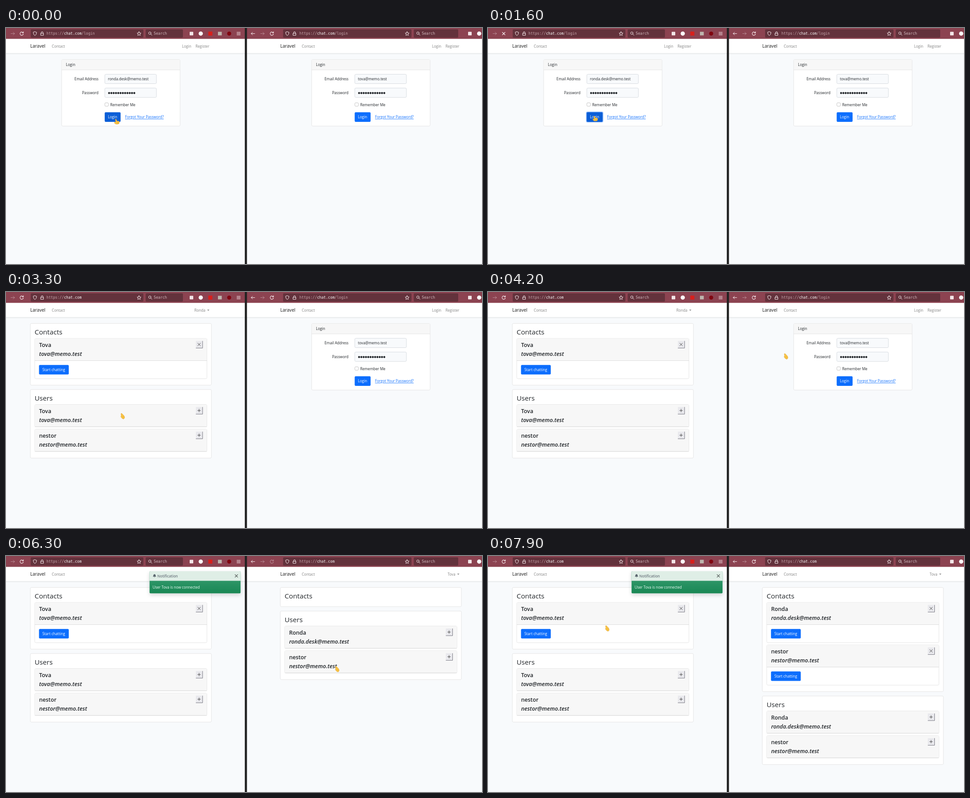
Write an HTML page that moves like this. It is 1060 by 528 pixels and loops after 8 s.

```html
<!DOCTYPE html>
<html lang="en">
<head>
<meta charset="utf-8">
<title>Two browsers, one chat</title>
<style>
html, body { margin: 0; width: 100%; height: 100%; overflow: hidden; background: #f8fafc; }
svg { display: block; width: 1060px; height: 528px; font-family: "Open Sans", sans-serif; }
.mono { font-family: "DejaVu Sans Mono", monospace; }
</style>
</head>
<body>
<svg id="stage" viewBox="0 0 1060 528"></svg>
<script>
const LOOP = 8000, STEP = 100, PANE_SHIFT = 556.7;
const BLUE = '#0d6efd', BLUE_HOVER = '#0b5ed7', INK = '#212529', MUTED = '#808080';
const LINE = '#dfdfdf', PALE = '#f7f7f7', SMALL = 8.15;

const ronda = { name: 'Ronda', email: 'ronda.desk@memo.test' };
const tova = { name: 'Tova', email: 'tova@memo.test' };
const nestor = { name: 'nestor', email: 'nestor@memo.test' };

// Times at which each browser changes
const panes = [
  { dx: 0, user: ronda, contacts: [tova], users: [tova, nestor],
    press: 1200, loading: 1300, open: 1900, contactsAt: 2200, usersAt: 2800, idleAt: 2800,
    bar: { forward: 15, reload: 35, field: [55, 251], search: [311, 83], extras: 413 } },
  { dx: PANE_SHIFT, user: tova, contacts: [ronda, nestor], users: [ronda, nestor],
    press: 5100, loading: 5200, open: 5700, contactsAt: 6700, usersAt: 6000, idleAt: 6600,
    bar: { back: 550, forward: 571, reload: 592, field: [617, 286], search: [908, 99], extras: 1033 } }
];
const NOTICE_AT = 6100;

// Pointer: time, left, top
const path = [
  [0, 241, 203], [100, 241, 203], [300, 262, 196], [500, 283, 172], [600, 270, 166], [800, 247, 205],
  [1000, 236, 199], [1100, 233, 196], [1900, 233, 196], [2300, 245, 190], [2500, 245, 190],
  [2600, 247, 189], [3000, 262, 225], [3400, 253, 286], [3600, 385, 195], [3800, 555, 122],
  [3900, 616, 137], [4100, 616, 137], [4200, 659, 137], [4500, 750, 176], [4800, 799, 203],
  [5700, 799, 203], [6000, 765, 228], [6300, 733, 246], [6600, 731, 248], [7000, 625, 195],
  [7400, 465, 139], [7500, 448, 145], [7700, 448, 145], [7800, 350, 151], [7900, 261, 155]
];

const icons = {
  right: 'M-4 0H4M1-3L4 0L1 3',
  left: 'M4 0H-4M-1-3L-4 0L-1 3',
  reload: 'M3.1-1.9A3.7 3.7 0 1 0 3.6 1M3.7-4.2V-1.5H1',
  cross: 'M-3-3L3 3M3-3L-3 3',
  plus: 'M-3.2 0H3.2M0-3.2V3.2',
  shield: 'M0-4.2L3.7-2.8Q3.7 2.6 0 4.3Q-3.7 2.6-3.7-2.8Z',
  lock: 'M-3-.5H3V4H-3ZM-2-.5V-2A2 2 0 0 1 2-2V-.5',
  star: 'M0-4.3L1.3-1.4L4.4-1.1L2.1 1L2.7 4.1L0 2.5L-2.7 4.1L-2.1 1L-4.4-1.1L-1.3-1.4Z',
  lens: 'M2-1A2.7 2.7 0 1 1-3.4-1A2.7 2.7 0 1 1 2-1M1.3 1L4 3.8',
  menu: 'M-3.8-2.8H3.8M-3.8 0H3.8M-3.8 2.8H3.8'
};

const rect = (x, y, w, h, fill, extra = '') =>
  `<rect x="${x}" y="${y}" width="${w}" height="${h}" fill="${fill}" ${extra}/>`;
const box = (x, y, w, h, fill = '#fff', line = LINE) =>
  rect(x, y, w, h, fill, `rx="2.5" stroke="${line}" stroke-width=".8"`);
const text = (x, y, content, size = SMALL, fill = INK, extra = '') =>
  `<text x="${x}" y="${y}" font-size="${size}" fill="${fill}" ${extra}>${content}</text>`;
const shape = (d, fill, extra = '') => `<path d="${d}" fill="${fill}" ${extra}/>`;
const icon = (name, x, y, color = '#fbf0f2', width = 1, opacity = 1) =>
  shape(icons[name], 'none', `transform="translate(${x} ${y})" stroke="${color}" stroke-width="${width}"
    stroke-linecap="round" stroke-linejoin="round" opacity="${opacity}"`);
const dot = (x, y, r, fill) => `<circle cx="${x}" cy="${y}" r="${r}" fill="${fill}"/>`;

function pointerAt(t) {
  const next = path.findIndex(key => key[0] > t);
  if (next < 0) return path.at(-1).slice(1);
  const [t0, x0, y0] = path[next - 1], [t1, x1, y1] = path[next];
  const k = (t - t0) / (t1 - t0);
  return [x0 + (x1 - x0) * k, y0 + (y1 - y0) * k];
}

function toolbar(pane, t) {
  const { back, forward, reload, field, search, extras } = pane.bar;
  const x = field[0], busy = t >= pane.loading && t < pane.open;
  const resting = t >= pane.open && t < pane.idleAt;
  const page = t < pane.open ? '/login' : '';
  let out = back ? icon('left', back, 12.5) : '';
  out += icon('right', forward, 12.5, '#fbf0f2', 1, .4);
  out += icon(busy ? 'cross' : 'reload', reload, 12.5, '#fbf0f2', 1.1, resting ? .4 : 1);
  out += rect(x, 3, field[1], 18.5, '#63323c', 'rx="2"') + rect(search[0], 3, search[1], 18.5, '#63323c', 'rx="2"');
  out += icon('shield', x + 9.5, 12.5) + icon('lock', x + 25.5, 12.3) + icon('star', x + field[1] - 9.7, 12.5);
  out += text(x + (back ? 36.5 : 35), 15, `https://<tspan fill="#fff">chat.com</tspan>${page}`, SMALL, '#c5a5ab', 'class="mono"');
  out += icon('lens', search[0] + 10, 12.5) + text(search[0] + 18, 15, 'Search', SMALL, '#d3bbc0', 'class="mono"');
  out += rect(extras - 4, 8.5, 8, 8, '#f3e6e8', 'rx="1"') + dot(extras + 20.7, 12.5, 4.7, '#fff');
  if (!back) {
    out += rect(450.5, 8, 9, 9, '#d8201c') + rect(472, 8.5, 8.5, 8, '#bdb6ae');
    out += dot(497, 12.5, 4.5, '#800610') + icon('menu', 518, 12.5);
  }
  return out;
}

function navbar(pane, loggedIn) {
  let out = text(54, 44.3, 'Laravel', 10.1, '#191919') + text(102, 44, 'Contact', SMALL, MUTED);
  if (loggedIn) {
    out += text(444, 44, pane.user.name, SMALL, MUTED, 'text-anchor="end"') + shape('M448 39.4H453L450.5 42Z', MUTED);
  } else {
    out += text(392, 44, 'Login', SMALL, MUTED) + text(422, 44, 'Register', SMALL, MUTED);
  }
  return out;
}

function loginPage(pane, t, hover) {
  const label = (y, s) => text(206, y, s, SMALL, INK, 'text-anchor="end"');
  let out = box(124, 70.4, 263.7, 149) + rect(124.4, 70.8, 262.9, 23, PALE) + rect(124, 93.4, 263.7, .8, LINE);
  out += text(133.5, 85.4, 'Login');
  out += label(117.2, 'Email Address') + box(220, 103.5, 115, 21, '#f8fafc', '#ced4da') + text(227, 117.2, pane.user.email);
  out += label(148, 'Password') + box(220, 134.3, 115, 21, '#f8fafc', '#ced4da');
  for (let i = 0; i < 12; i++) out += dot(229.6 + i * 5.1, 145.5, 2.2, INK);
  out += rect(220.2, 167.3, 7.8, 7.8, '#fff', 'rx="2" stroke="#b5b5b5" stroke-width=".8"') + text(232, 174.5, 'Remember Me');
  if (t >= pane.press) out += rect(218.2, 187, 38.6, 24.3, '#94bdfb', 'rx="3.5"');
  out += rect(219.8, 188.5, 35.4, 21.4, hover === 'login' ? BLUE_HOVER : BLUE, 'rx="2.2"') + text(227, 202.4, 'Login', SMALL, '#fff');
  return out + text(265, 202.4, 'Forgot Your Password?', SMALL, hover === 'link' ? '#0a58ca' : BLUE, 'text-decoration="underline"');
}

function person(y, { name, email }, isContact) {
  let out = box(64, y, 383.5, isContact ? 90 : 50);
  out += rect(64.4, y + .4, 382.7, 49, PALE) + rect(64, y + 49.2, 383.5, .8, '#d5d5d5');
  out += text(73.7, y + 18.9, name, 12.3, INK, 'font-weight="600"');
  out += text(73.7, y + 39, email, 12.4, INK, 'font-weight="600" font-style="italic"');
  out += rect(422.8, y + 5.6, 15.4, 16.2, '#e9e9ed') + shape(`M422.8 ${y + 21.5}H437.8V${y + 5.6}`, 'none', 'stroke="#777781" stroke-width="1"');
  out += icon(isContact ? 'cross' : 'plus', 430, y + 13.5, '#222', .8);
  if (isContact) out += rect(73.5, y + 59.3, 66.3, 21.2, BLUE, 'rx="2.2"') + text(81, y + 73, 'Start chatting', SMALL, '#fff');
  return out;
}

function listCard(y, title, people, isContact) {
  const pitch = isContact ? 95 : 55.2;
  const height = 43 + people.length * pitch;
  const items = people.map((p, i) => person(y + 33.5 + i * pitch, p, isContact)).join('');
  return [box(54.2, y, 403.2, height) + text(63.8, y + 24.5, title, 15.2) + items, y + height + 9.8];
}

function homePage(pane, t) {
  const [contacts, nextY] = listCard(70.4, 'Contacts', t >= pane.contactsAt ? pane.contacts : [], true);
  return contacts + listCard(nextY, 'Users', t >= pane.usersAt ? pane.users : [], false)[0];
}

function notice() {
  return `<g filter="url(#soft)">${rect(319.7, 34, 202.6, 49.4, 'url(#green)', 'rx="2"')}</g>`
    + shape('M319.7 55.5V36Q319.7 34 321.7 34H520.3Q522.3 34 522.3 36V55.5Z', '#dfeee6')
    + shape('M327 46.2Q328.2 45 328.2 43Q328.3 41 330.7 40.4Q333.2 41 333.2 43Q333.2 45 334.5 46.2ZM329.6 46.8H331.9Q330.7 48.6 329.6 46.8Z', '#5d6870')
    + text(337, 47.7, 'Notification', 8, '#6c757d', 'font-weight="600"')
    + icon('cross', 513, 44.5, '#5b625f', 1.1)
    + text(326.5, 73, `User ${tova.name} is now connected`, SMALL, '#f2fff8');
}

function hoverTarget(pane, t, [x, y]) {
  const px = x + 3 - pane.dx, py = y + 1;
  if (t >= pane.open) return '';
  if (px > 220 && px < 255 && py > 188 && py < 210) return 'login';
  return px > 265 && px < 351 && py > 194 && py < 206 ? 'link' : '';
}

function hand([x, y], pointing) {
  const outline = pointing
    ? 'M2.6 1.5Q4 0 4.8 2L5.8 5L10 5.4Q11.6 6 11.2 9Q10.8 12 8 12H3.4L.4 9.4Q0 7.4 1.6 7.6L3.6 8.2Z'
    : 'M.8 1.6Q1.8-.2 3.2 1.6L7.4 6Q9 7.8 8.8 11L6.6 13.4Q3.2 12.8 1.6 10L.5 8Q.3 6.8 1.6 6.8Z';
  const fingers = pointing ? 'M6 8H9.8M6.3 10H9.6' : 'M3.3 8.2L5.6 6.8M4.4 10.4L7 8.6';
  return `<g transform="translate(${x} ${y})" stroke="#d99a2b" stroke-width=".7">`
    + shape(outline, '#fbc745') + shape(fingers, 'none') + '</g>';
}

const defs = `<defs>
  <linearGradient id="shade" x2="0" y2="1"><stop stop-color="#000" stop-opacity=".09"/><stop offset="1" stop-color="#000" stop-opacity="0"/></linearGradient>
  <linearGradient id="green" x2="0" y2="1"><stop offset=".4" stop-color="#2f9668"/><stop offset="1" stop-color="#198754"/></linearGradient>
  <filter id="soft" x="-10%" y="-30%" width="120%" height="180%"><feDropShadow dx="0" dy="4" stdDeviation="4" flood-opacity=".15"/></filter>
</defs>`;

function scene(t) {
  const pos = pointerAt(t);
  let pointing = false;
  let out = defs + rect(0, 0, 1060, 528, '#f8fafc') + rect(0, 24, 1060, 32.3, '#fff')
    + rect(0, 56.3, 1060, 3, 'url(#shade)') + rect(0, 0, 1060, 24.3, '#8c4351');
  for (const pane of panes) {
    const hover = hoverTarget(pane, t, pos), loggedIn = t >= pane.open;
    pointing ||= hover !== '';
    out += toolbar(pane, t) + `<g transform="translate(${pane.dx} 0)">`
      + navbar(pane, loggedIn) + (loggedIn ? homePage(pane, t) : loginPage(pane, t, hover)) + '</g>';
  }
  if (t >= NOTICE_AT) out += notice();
  return out + rect(531.8, 0, 4.8, 528, '#222') + hand(pos, pointing);
}

const stage = document.getElementById('stage');
let shown = -1;
function draw(now) {
  const t = Math.floor(now % LOOP / STEP) * STEP;
  if (t !== shown) stage.innerHTML = scene(shown = t);
  requestAnimationFrame(draw);
}
draw(performance.now());
</script>
</body>
</html>
```
